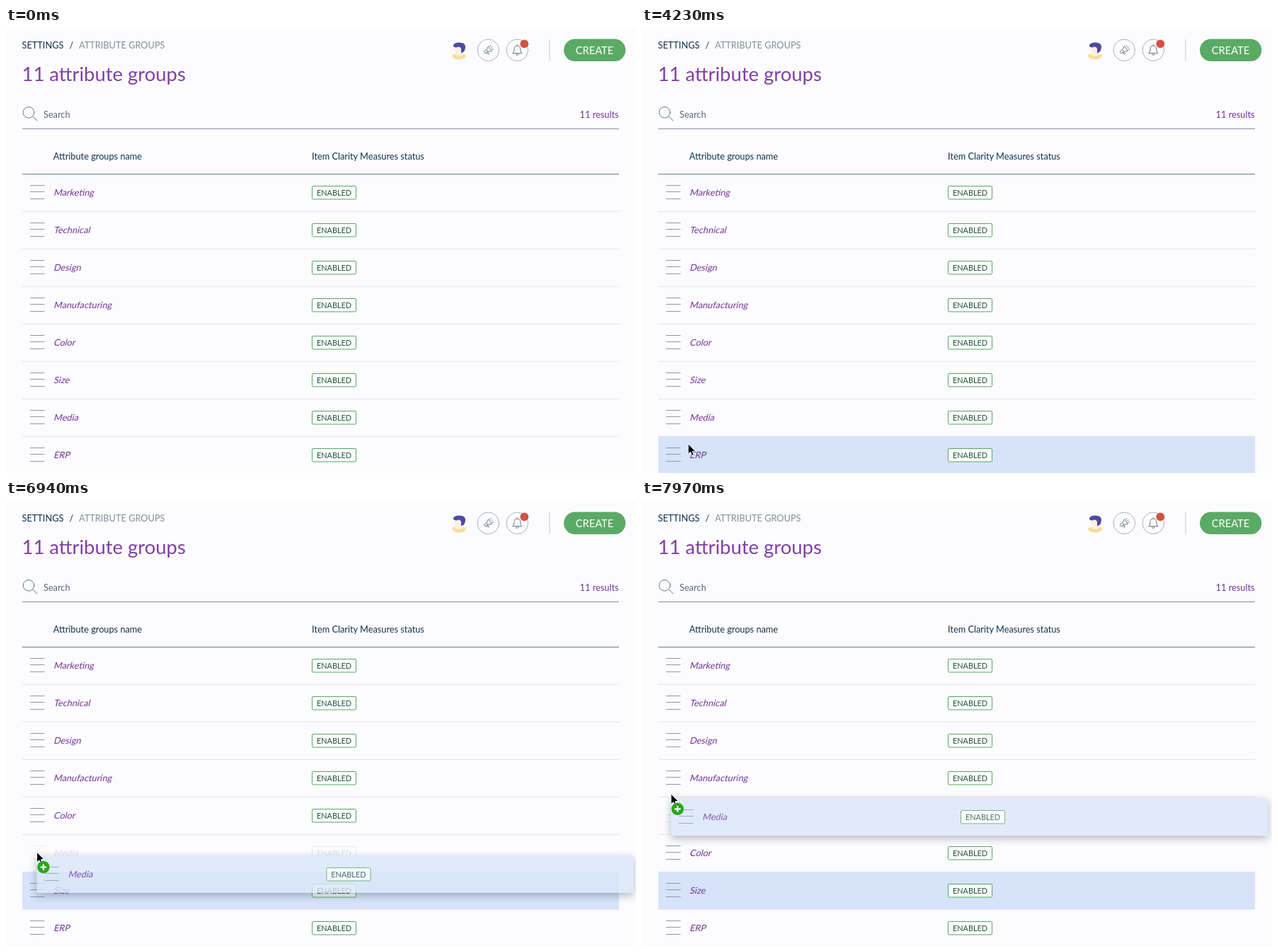
Recreate the animation shown at these times as an HTML page. Size 890 px wide and 629 px high, loop 7990 ms.

```html
<!DOCTYPE html>
<html lang="en">
<head>
<meta charset="utf-8">
<title>Attribute groups</title>
<style>
  html, body { margin: 0; width: 100%; height: 100%; overflow: hidden; background: #fcfcfe; }
  svg { display: block; width: 890px; height: 629px; font: 12.75px Lato, sans-serif; }
  .ink { fill: #11324d; }
  .name { fill: #6f3399; }
  .icon { fill: none; stroke: #67768a; stroke-linecap: round; stroke-linejoin: round; }
  .status { fill: #1f5239; font-size: 10.9px; }
  #ghost .card { filter: drop-shadow(0 4px 6px rgba(20, 30, 60, .38)); }
</style>
</head>
<body>
<svg viewBox="0 0 890 629">
  <text class="ink" x="22.5" y="28.700">SETTINGS</text>
  <text class="ink" x="89.5" y="28.700">/</text>
  <text x="103" y="28.700" fill="#848e9d">ATTRIBUTE GROUPS</text>
  <text x="22.5" y="74.800" font-size="27.45" fill="#8040a3">11 attribute groups</text>

  <!-- avatar -->
  <path d="M630 38q10-4 20 0q0 6-10 6.500q-10-.5-10-6.500z" fill="#f9dc98"/>
  <path d="M634 26h9v9q3 1 3 3q-6 4-12 0q2-1 2-2q-2-1-2-4z" fill="#fdeee4"/>
  <path d="M632 26q-1-5 8-5.500q9 0 9 6q0 4-2 7l-4 2v-6q-1-3-4-3q-4 2-7-.5z" fill="#4b4aa0"/>

  <g class="icon">
    <circle cx="681.300" cy="31.300" r="15.300" stroke="#a9b1bd"/>
    <circle cx="722.300" cy="31.300" r="15.300" stroke="#a9b1bd"/>
    <g transform="translate(680.500 31.500) rotate(-35) scale(.85)">
      <path d="M-6-2h5l6-3v10l-6-3h-5zM-1-2v4M-4 2l1 4h2l-1-4M7-3l2-1M7.500 0h2M7 3l2 1"/>
    </g>
    <path d="M716 35.500q2-2 2-6q0-4.500 4.300-4.500t4.300 4.500q0 4 2 6zM720.500 36q0 2.500 1.800 2.500t1.800-2.500M722.300 25v-1.300"/>
    <circle cx="32" cy="119.300" r="7.800"/>
    <path d="M37.700 125l6.300 6"/>
  </g>
  <circle cx="732.300" cy="22.300" r="5.900" fill="#d2513f"/>
  <path d="M768 16v31" stroke="#c3c8d0"/>
  <rect x="788" y="15.600" width="87.300" height="31.400" rx="15.700" fill="#5aaa65"/>
  <text x="831.500" y="37.300" font-size="14.7" text-anchor="middle" fill="#fff">CREATE</text>

  <text x="53" y="126.700" fill="#56677c">Search</text>
  <text x="865.500" y="126.700" text-anchor="end" fill="#6f3399">11 results</text>
  <path d="M23 142.500h843" stroke="#8e8ba5"/>
  <text class="ink" x="66.700" y="186">Attribute groups name</text>
  <text class="ink" x="432" y="186">Item Clarity Measures status</text>

  <rect id="hover" x="23" width="843" height="53" fill="#d6e3f8"/>
  <g id="lines" stroke="#e2e1ef"></g>
  <path d="M23 206.500h843" stroke="#667893"/>
  <g id="rows"></g>
  <g id="ghost" opacity=".8"></g>

  <g id="cursor">
    <g id="arrow" stroke="#fff">
      <path d="M0 0V14.500L3.300 11.500L5.400 16.500L8 15.400L5.900 10.500H10.500Z"/>
      <g id="plus">
        <circle cx="9.300" cy="21.300" r="9" fill="#2aa51f" stroke="#d8ead8" stroke-width=".6"/>
        <path d="M5 21.300h8.600M9.300 17v8.600" stroke-width="2.200"/>
      </g>
    </g>
    <path id="move" stroke="#fff" stroke-width="1" paint-order="stroke"
      d="M0-7.500l3 3.500h-2v3h3v-2l3.500 3l-3.500 3v-2h-3v3h2l-3 3.500l-3-3.500h2v-3h-3v2l-3.500-3l3.500-3v2h3v-3h-2z"/>
  </g>
</svg>
<script>
const LOOP = 7990, ROW = 53, TOP = 206;
const DRAG_START = 6620, HOVER_START = 3400, HANDLE_REACHED = 4600;
const names = ['Marketing', 'Technical', 'Design', 'Manufacturing', 'Color', 'Size', 'Media', 'ERP'];
const DRAGGED = 6;

// [time, x, y]
const cursorPath = [
  [2380, 108, 632], [3010, 79, 585], [3400, 79, 585], [4300, 64, 588], [4700, 45, 558],
  [4970, 45, 556], [5850, 45, 556], [6510, 44, 545], [6620, 44, 543], [6800, 44, 515],
  [7130, 43, 471], [7450, 43, 446], [7970, 41, 414]
];
const ghostPath = [
  [6620, 23, 524], [6800, 43, 518], [7130, 44, 478], [7450, 43, 448.5], [7970, 41, 420]
];

const el = id => document.getElementById(id);
const rowTop = i => TOP + ROW * i;
const show = (node, on) => node.setAttribute('display', on ? 'inline' : 'none');
const place = (node, x, y) => node.setAttribute('transform', `translate(${x} ${y})`);

// Row content with its left edge at x = 0 and its top at y = 0.
// Names are the upright face slanted, which is wider than the true italic.
const rowMarkup = name => `
  <path d="M11 16.500h20.500M11 25.500h20.500M11 35.500h20.500" stroke="#8d98a8"/>
  <text class="name" transform="translate(44 31) skewX(-14)">${name}</text>
  <rect x="409.500" y="17.500" width="62" height="18.500" rx="1.500" fill="#fdfefd" stroke="#55a663"/>
  <text class="status" x="440.500" y="30.700" text-anchor="middle">ENABLED</text>`;

el('lines').innerHTML = names.slice(1).map((_, i) => `<path d="M23 ${rowTop(i + 1) + .3}h843"/>`).join('');
el('rows').innerHTML = names.map(name => `<g>${rowMarkup(name)}</g>`).join('');
el('ghost').innerHTML = `<rect class="card" width="843" height="53" fill="#dae7fa"/>${rowMarkup(names[DRAGGED])}`;
const rows = [...el('rows').children];

function along(path, t) {
  if (t <= path[0][0]) return path[0].slice(1);
  const i = path.findIndex(key => key[0] > t);
  if (i < 0) return path[path.length - 1].slice(1);
  const [t0, x0, y0] = path[i - 1], [t1, x1, y1] = path[i];
  const k = (t - t0) / (t1 - t0);
  return [x0 + (x1 - x0) * k, y0 + (y1 - y0) * k];
}

function draw(t) {
  const [x, y] = along(cursorPath, t);
  const dragging = t >= DRAG_START;
  const onHandle = t >= HANDLE_REACHED && !dragging;

  show(el('cursor'), t >= cursorPath[0][0]);
  place(el('cursor'), x, y);
  show(el('arrow'), !onHandle);
  show(el('move'), onHandle);
  show(el('plus'), dragging);

  show(el('hover'), t >= HOVER_START);
  el('hover').setAttribute('y', rowTop(y >= rowTop(7) ? 7 : 6));

  show(el('ghost'), dragging);
  place(el('ghost'), ...along(ghostPath, t));

  // The dragged row moves up one slot each time the pointer passes a row's middle
  let slot = DRAGGED;
  while (dragging && y < rowTop(slot - 1) + ROW / 2) slot--;
  rows.forEach((row, i) => {
    const index = i === DRAGGED ? slot : i >= slot && i < DRAGGED ? i + 1 : i;
    place(row, 23, rowTop(index));
  });
  rows[DRAGGED].setAttribute('opacity', dragging ? .15 : 1);
}

const start = performance.now();
function tick() {
  draw((performance.now() - start) % LOOP);
  requestAnimationFrame(tick);
}
tick();
</script>
</body>
</html>
```
